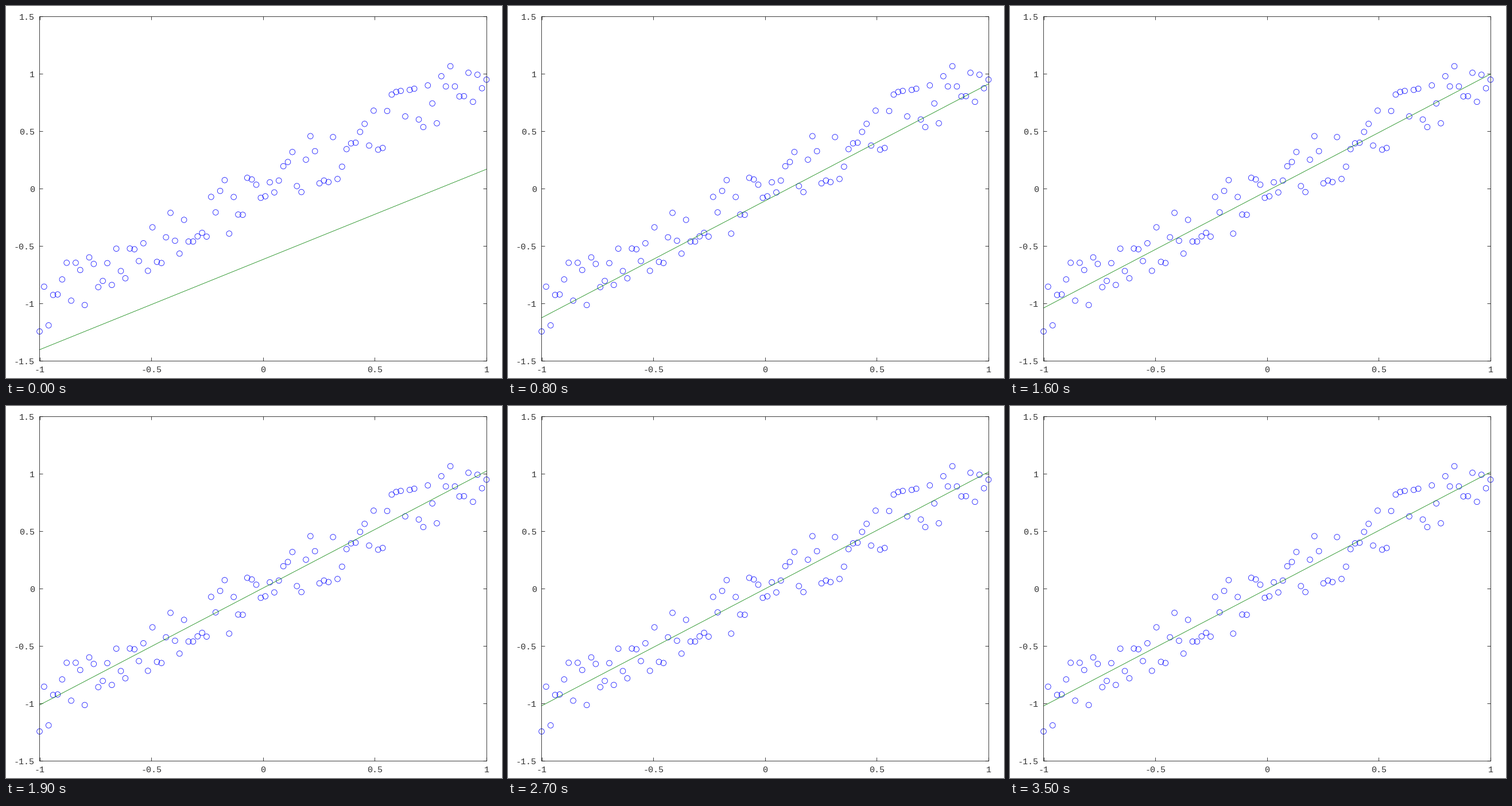
A matplotlib script that plays this animation: 864 px wide and 648 px high, repeating every 3.6 s.

```python
import numpy as np
import matplotlib.pyplot as plt
from matplotlib.animation import FuncAnimation

W, H, DPI = 864, 648, 108
FRAMES, INTERVAL = 36, 100
LEFT, RIGHT, TOP, BOTTOM = 58.5, 837, 18.3, 618.3
RATE = 1.8

# Noisy samples of a straight line, in thousandths
x = np.linspace(-1, 1, 100)
y = np.array([
    -1243, -853, -1190, -925, -921, -790, -645, -975, -645, -708,
    -1013, -598, -655, -857, -803, -648, -838, -522, -717, -780,
    -521, -527, -630, -475, -715, -336, -637, -647, -423, -210,
    -453, -565, -271, -460, -460, -415, -384, -417, -71, -206,
    -19, 75, -391, -72, -225, -227, 95, 81, 35, -79,
    -66, 56, -32, 71, 196, 233, 320, 23, -29, 253,
    458, 327, 47, 71, 58, 450, 85, 192, 345, 395,
    401, 495, 565, 376, 680, 340, 355, 677, 820, 843,
    852, 630, 861, 871, 603, 537, 900, 743, 570, 980,
    891, 1067, 891, 804, 806, 1010, 757, 993, 875, 950]) / 1000


def descend(theta, steps):
    """Gradient descent on the squared error; returns every iterate."""
    A = np.column_stack([np.ones_like(x), x])
    path = [np.array(theta)]
    for _ in range(steps - 1):
        grad = A.T @ (A @ path[-1] - y) / len(x)
        path.append(path[-1] - RATE * grad)
    return path


path = descend([-0.616, 0.786], FRAMES)

plt.rcParams["font.family"] = "Liberation Mono"
plt.rcParams["axes.unicode_minus"] = False

fig = plt.figure(figsize=(W / DPI, H / DPI), dpi=DPI, facecolor="white")
ax = fig.add_axes([LEFT / W, 1 - BOTTOM / H,
                   (RIGHT - LEFT) / W, (BOTTOM - TOP) / H])
ax.set(xlim=(-1, 1), ylim=(-1.5, 1.5))
ax.set_xticks(np.arange(-1, 1.1, 0.5))
ax.set_yticks(np.arange(-1.5, 1.6, 0.5))
for axis in (ax.xaxis, ax.yaxis):
    axis.set_major_formatter(lambda v, _: f"{v:g}")
ax.tick_params(direction="in", top=True, right=True, length=4.2, width=0.5,
               pad=5.8, labelsize=10, labelcolor="#303030")
for spine in ax.spines.values():
    spine.set_linewidth(0.5)

ax.scatter(x, y, s=6.4 ** 2, facecolors="none", edgecolors="#0000ff",
           linewidths=0.5, clip_on=False, zorder=2)
fit, = ax.plot([], [], color="#008000", lw=0.5, zorder=2.2)


def update(i):
    b, m = path[i]
    fit.set_data([-1, 1], [b - m, b + m])
    return fit,


anim = FuncAnimation(fig, update, frames=FRAMES, interval=INTERVAL,
                     repeat=True, repeat_delay=0)
plt.show()
```
